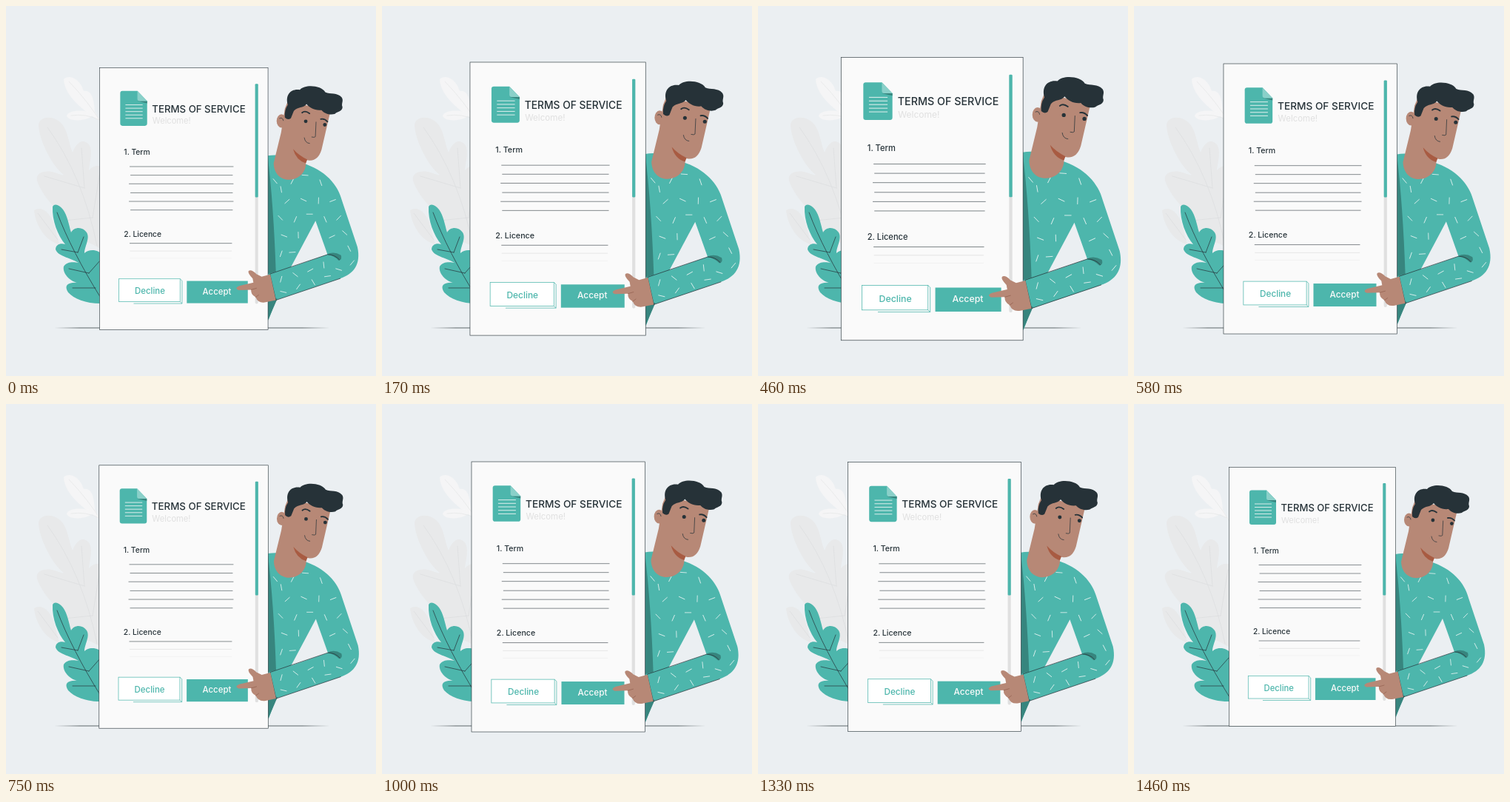
These frames come from a looping animation (500 px wide and 500 px high, 1.5 s). An HTML page:

```html
<!DOCTYPE html>
<html lang="en">
<head>
<meta charset="utf-8">
<style>
  html, body { margin: 0; width: 100%; height: 100%; overflow: hidden; background: #ebeff2; }
  svg { display: block; width: 100%; height: 100%; font-family: Inter, sans-serif; font-weight: 500; }
  .teal { fill: #4db6ac; }
  .dark { fill: #263238; }
  .skin { fill: #b78876; }
  .line { fill: none; stroke: #263238; stroke-width: .7; stroke-linecap: round; }
</style>
</head>
<body>
<svg viewBox="0 0 500 500">
  <!-- plants and floor -->
  <g fill="#f5f5f6">
    <path d="M78 99C84 92 100 97 105 115C116 113 119 126 120 143L128 156C104 142 79 121 78 99Z"/>
    <path d="M82 149C82 140 108 139 119 146C112 155 88 158 82 149Z"/>
    <path class="line" style="stroke:#e4e5e6" d="M85 102Q112 130 130 160M88 148Q108 145 126 154"/>
  </g>
  <g fill="#e8e9ea">
    <path d="M44 160C46 149 62 148 72 156C84 166 84 184 90 198C93 190 99 180 108 184C120 190 113 210 112 222C118 215 126 214 132 218V330L122 325C112 318 88 312 76 303C66 294 72 284 82 284C66 276 48 254 42 236C40 226 50 222 62 224C72 226 76 230 78 228C62 216 44 180 44 160Z"/>
    <path d="M38 276C48 269 62 280 66 300L72 322C56 319 40 299 38 276Z"/>
    <path class="line" style="stroke:#dcddde" d="M56 164Q104 230 123 324M106 246L102 192M106 246L52 230M117 286L127 224M117 286L78 290M43 280L70 316"/>
  </g>
  <path class="teal" d="M63 271C66 266 72 269 77 275C83 283 85 296 88 306C92 298 104 298 109 306C114 314 106 325 106 334C112 328 125 328 132 338V402C110 403 92 396 84 387C78 378 83 373 97 374C85 372 76 360 78 352C82 345 92 346 98 347C86 340 70 338 67 329C67 322 74 320 80 322C70 310 62 290 63 271Z"/>
  <path class="line" d="M69 279Q88 330 129 396M97 333L105 312M97 333L75 329M112 361L128 343M112 361L85 355M121 381L90 381"/>
  <path fill="#8d9497" d="M65 435L100 434.3H400L438 435L400 435.8H100Z"/>

  <g id="scene">
    <!-- man -->
    <path class="teal" d="M353 203Q375 199 400 213C430 222 447 242 452 262L473 325C478 348 468 361 450 367L364 396L354 423Z"/>
    <path fill="#ebeff2" d="M417 290L384 352L433 335Z"/>
    <path fill="#37857e" d="M353 203Q361 270 364 358L353 361ZM366 394L353 424V392ZM432 335Q441 330 451 336Q453 342 448 343Q441 336 432 335Z"/>
    <g id="dashes" stroke="#e4f3f1" stroke-width=".8" stroke-linecap="round"></g>
    <path class="line" d="M364 396L356 361L433 335Q443 335 449 342M364 396L450 367"/>
    <ellipse class="skin" cx="371.5" cy="156.5" rx="6.5" ry="9"/>
    <path class="skin" d="M380 130L437 143L425 195Q420 211 407 209L404 208V216C400 241 362 243 361 213L371 172L376 140Z"/>
    <path fill="#a85b42" d="M387 194Q395 203 406 208L404 213Q391 209 387 194Z"/>
    <path class="dark" d="M376 152Q375 142 380 135C376 122 384 113 396 115C403 107 425 109 430 118C437 121 446 118 452 125C455 130 451 133 453 138C453 144 446 144 443 147C437 149 429 147 425 142C416 143 409 139 405 134C400 140 394 137 388 143Q386 148 384 153Q380 156 376 152Z"/>
    <path class="line" d="M417.7 158L416.8 177.5Q416 179 412 178M402 179Q403 186 409 186.5M369 153Q373 151 374 156" stroke-linejoin="round"/>
    <path class="line" style="stroke-width:1.8" d="M399 145.5Q403 142 409 146.5M424 154Q429 153 433 157.5"/>
    <circle class="dark" cx="403.9" cy="157" r="2.4"/>
    <circle class="dark" cx="429.4" cy="161.6" r="2.4"/>

    <!-- page -->
    <rect x="128.5" y="85.5" width="225" height="350" fill="#fafafa" stroke="#263238" stroke-width=".6"/>
    <rect x="336.3" y="107" width="4" height="294" rx="2" fill="#e0e0e0"/>
    <rect class="teal" x="336.3" y="107" width="4" height="151.5" rx="1"/>
    <path class="teal" d="M159 116.5H179L192 130V160Q192 163 189 163H159Q156 163 156 160V119.5Q156 116.5 159 116.5Z"/>
    <path fill="#37857e" d="M179 130H192V133Z"/>
    <path fill="#8ad0c9" d="M179 116.5L192 130H182Q179 130 179 127Z"/>
    <path stroke="#fafafa" stroke-width=".8" d="M163 135H186M163 139.5H186M163 144H186M163 148.5H186M163 153H186"/>
    <g class="dark" font-size="10.2">
      <text x="198.5" y="145" font-size="13.1">TERMS OF SERVICE</text>
      <text x="199" y="160.5" font-size="11" font-weight="400" style="fill:#e0e0e0">Welcome!</text>
      <text x="161" y="201.5">1. Term</text>
      <text x="161" y="311">2. Licence</text>
    </g>
    <path class="line" style="stroke:#7b8286;stroke-width:.9" d="M169 217.5H307M170 229H306M168 240.5H307M170 252.5H306M168 264H307M170 275.5H306M169 320H305"/>
    <path stroke="#dedede" stroke-width=".7" d="M169 330.3H305"/>
    <path stroke="#f0f0f0" stroke-width=".7" d="M169 340H305"/>
    <path fill="none" stroke="#4db6ac" stroke-width=".7" d="M236 367.5L238.7 370V400.5H174M236 398L238.7 400.5"/>
    <rect x="154.3" y="367.5" width="81.7" height="30.5" fill="#fff" stroke="#4db6ac" stroke-width=".7"/>
    <rect class="teal" x="245" y="370.3" width="81.5" height="29.7"/>
    <g font-size="11.3">
      <text class="teal" x="175.5" y="388">Decline</text>
      <text x="266" y="388.3" fill="#fafafa">Accept</text>
    </g>

    <!-- pointing hand -->
    <path class="skin" d="M356.5 361.5L364 396L349 399Q340 400 337 392Q330 388 331 382L314 382.5Q308 380 315 377L334 372.5L333 367Q326 360 327.5 357Q331 354 338 361L345 364.5Z"/>
    <path class="line" style="stroke:#93604f" d="M331 382L338 380M337 392L341 389"/>
  </g>
</svg>
<script>
  const LOOP = 1500, STEPS = 36;

  // Pulse keys: [step, share of the full 10% growth]
  const keys = [[0, .114], [8, .9], [10, 1], [14, .43], [18, .155], [19.5, .13],
                [24, .43], [26, .82], [28, 1], [35, 0]];

  const key = i => {
    const n = keys.length, turn = Math.floor(i / n), [x, y] = keys[i - turn * n];
    return [x + turn * STEPS, y];
  };
  const slope = i => {
    const [a, b, c] = [key(i - 1), key(i), key(i + 1)];
    const before = (b[1] - a[1]) / (b[0] - a[0]), after = (c[1] - b[1]) / (c[0] - b[0]);
    return before * after <= 0 ? 0 : 2 * before * after / (before + after);
  };
  function pulse(x) {
    let i = 0;
    while (key(i + 1)[0] <= x) i++;
    const [x0, y0] = key(i), [x1, y1] = key(i + 1), d = x1 - x0, t = (x - x0) / d, u = 1 - t;
    return u * u * ((1 + 2 * t) * y0 + t * d * slope(i)) +
           t * t * ((1 + 2 * u) * y1 - u * d * slope(i + 1));
  }

  // Shirt pattern
  const spots = [[363, 237], [386, 237], [403, 229], [424, 239], [379, 264], [401, 262], [421, 263],
    [440, 263], [370, 286], [390, 288], [409, 281], [430, 288], [448, 286], [375, 310], [394, 309],
    [439, 311], [456, 306], [371, 334], [386, 332], [462, 327], [466, 346], [448, 355], [428, 349],
    [410, 356], [390, 362], [371, 368], [433, 364], [414, 372], [394, 378], [374, 385], [371, 248]];
  document.getElementById("dashes").innerHTML = spots.map(([x, y], i) =>
    `<path d="M-4 0H4" transform="translate(${x} ${y}) rotate(${i * 67 + 50})"/>`).join("");

  const scene = document.getElementById("scene");
  function draw() {
    const step = Math.floor((performance.now() % LOOP + 4) / LOOP * STEPS) % STEPS;
    const scale = 1 + .1 * pulse(step);
    scene.setAttribute("transform", `translate(303.5 260) scale(${scale}) translate(-303.5 -260)`);
    requestAnimationFrame(draw);
  }
  draw();
</script>
</body>
</html>
```
